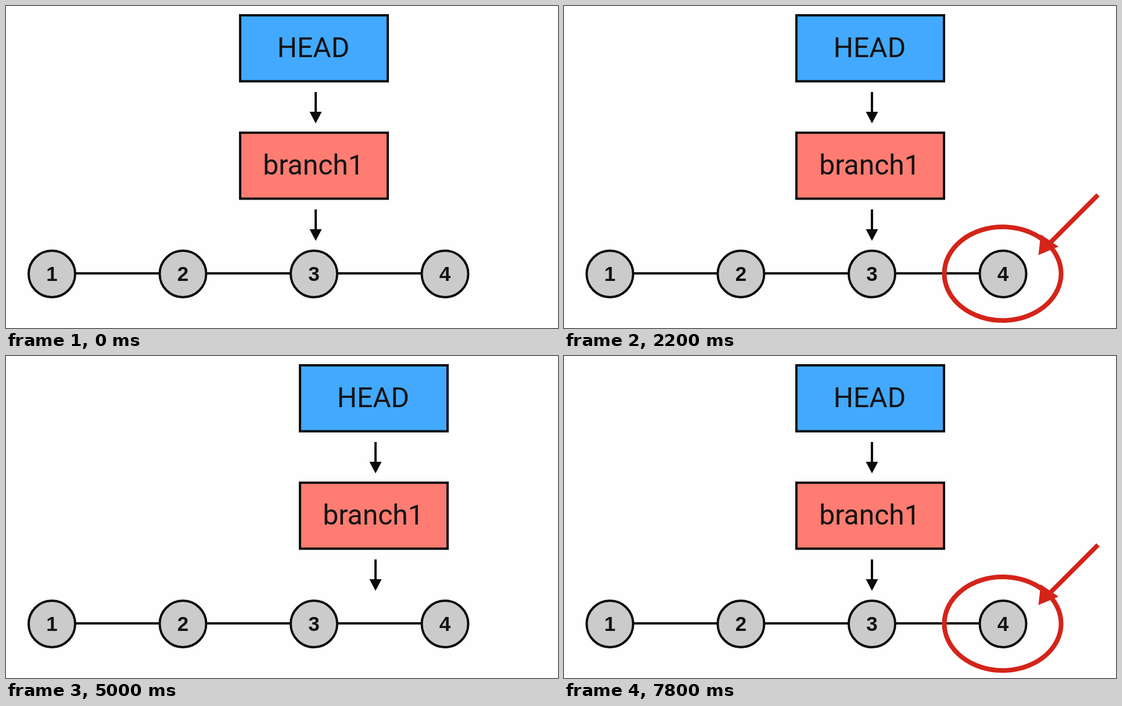
These frames come from a looping animation (950x554 px, 8000 ms). An HTML page:

```html
<!DOCTYPE html>
<html lang="en">
<head>
<meta charset="utf-8">
<title>Branch reset</title>
<style>
  html, body { margin: 0; width: 100%; height: 100%; overflow: hidden; background: #fefefe; }
  svg { display: block; width: 100vw; height: 100vh; }
  .label { font: 48px Roboto, sans-serif; text-anchor: middle; fill: #131313; }
  .num { font: bold 35px "Liberation Sans", Arial, sans-serif; text-anchor: middle; fill: #131313; }
  .ink { stroke: #0c0c0c; stroke-width: 4; }
  .red { stroke: #d42419; stroke-width: 8; fill: none; }
</style>
</head>
<body>
<svg viewBox="0 0 950 554">
  <defs>
    <g id="down">
      <path class="ink" d="M0 0V38"/>
      <path d="M-10.5 34H10.5L0 54Z" fill="#0c0c0c"/>
    </g>
  </defs>
  <path class="ink" d="M79 460H755"/>
  <g id="nodes"></g>
  <g id="stack">
    <rect class="ink" x="-127" y="16" width="254" height="113.5" fill="#42a9ff"/>
    <text class="label" x="-1" y="88">HEAD</text>
    <use href="#down" x="3" y="148"/>
    <rect class="ink" x="-127" y="218" width="254" height="113.5" fill="#ff7c72"/>
    <text class="label" x="-1" y="290">branch1</text>
    <use href="#down" x="3" y="350"/>
  </g>
  <ellipse id="ring" class="red" cx="755" cy="460.5" rx="100.5" ry="80.5"/>
  <g id="pointer">
    <path class="red" d="M919 325L833 411"/>
    <path d="M816.5 428.5L820.5 393L851 414Z" fill="#d42419"/>
  </g>
</svg>
<script>
  const LOOP = 8000, CYCLE = 5400, STEP = 200;
  const RESTART = 3000;               // hard cut back to the starting state
  const FROM = 753, TO = 527;
  const el = id => document.getElementById(id);
  const clamp = v => Math.min(1, Math.max(0, v));
  const ramp = (t, start, length) => clamp((t - start) / length);
  const ease = p => (1 - Math.cos(Math.PI * p)) / 2;

  el("nodes").innerHTML = [1, 2, 3, 4].map((n, i) => {
    const x = 79 + i * 225.5;
    return `<circle class="ink" cx="${x}" cy="461" r="40" fill="#cbcbcb"/>` +
           `<text class="num" x="${x}" y="473">${n}</text>`;
  }).join("");

  function draw(time) {
    const t = Math.floor((time + 5) / STEP) * STEP % LOOP % CYCLE;
    // time since the most recent restart
    const u = (t - RESTART + CYCLE) % CYCLE;
    const x = FROM + (TO - FROM) * ease(ramp(u, 1489, 983));
    el("stack").setAttribute("transform", `translate(${x.toFixed(2)} 0)`);
    el("ring").setAttribute("opacity", ramp(u, 2600, 1000));
    el("pointer").setAttribute("opacity", ramp(u, 3850, 700));
  }

  const begin = performance.now();
  function tick() {
    draw((performance.now() - begin) % LOOP);
    requestAnimationFrame(tick);
  }
  tick();
</script>
</body>
</html>
```
